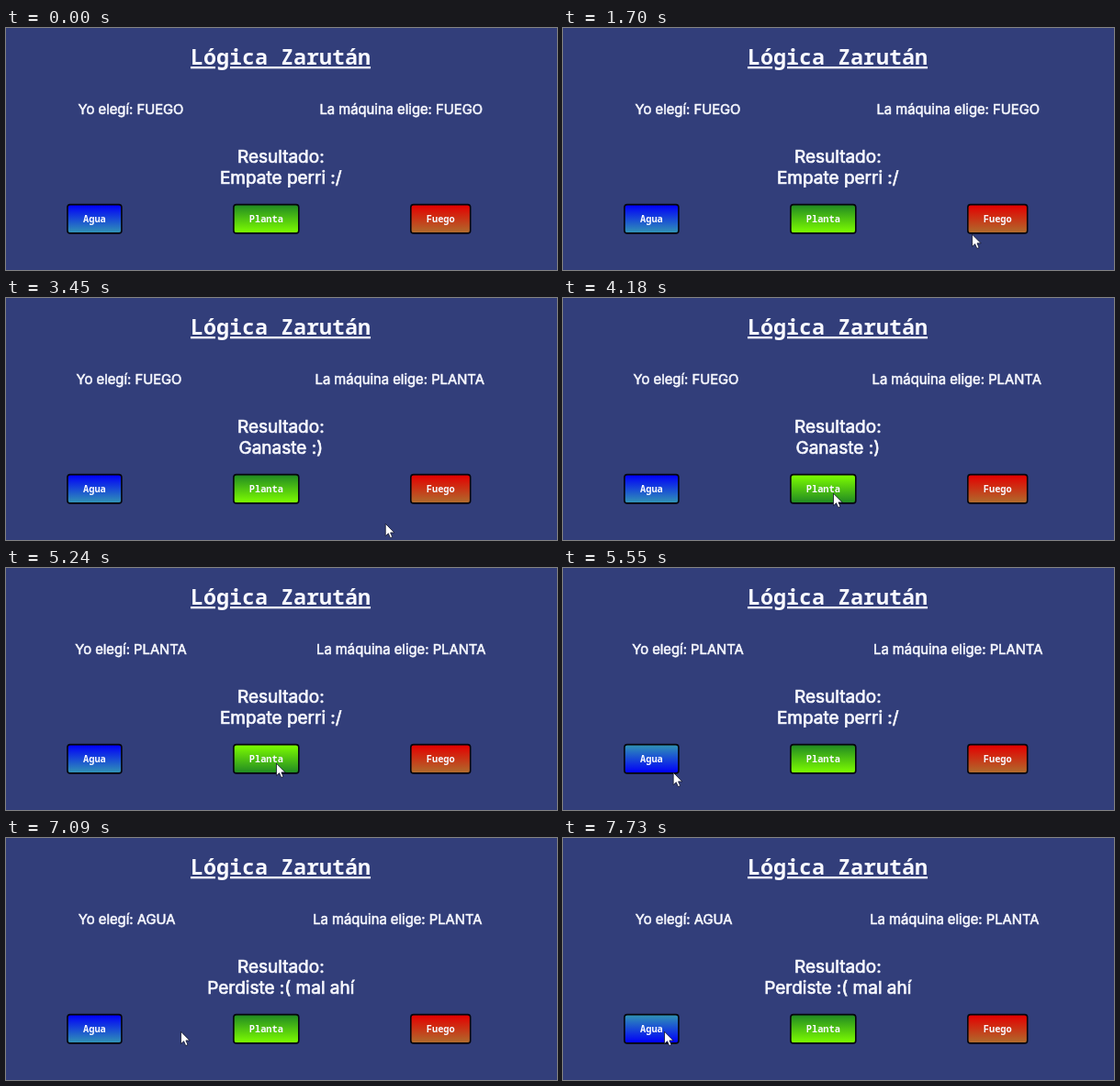
Write an HTML page that moves like this. It is 600 px wide and 264 px high and loops after 8.03 s.

```html
<!DOCTYPE html>
<html lang="es">
<head>
<meta charset="utf-8">
<title>Lógica Zarután</title>
<style>
  html, body { margin: 0; width: 100%; height: 100%; overflow: hidden; background: #323e7a; }
  svg { display: block; width: 100vw; height: 100vh; }
  text { fill: #f8f9ff; text-anchor: middle; white-space: pre; }
  .title {
    font: 700 23.35px "Noto Sans Mono", "DejaVu Sans Mono", monospace;
    text-decoration: underline;
    text-decoration-thickness: 1.8px;
    text-underline-offset: 2.2px;
  }
  /* Regular weight thickened by a stroke, like a synthetic bold */
  .pick, .result {
    font-family: Inter, "Open Sans", sans-serif;
    font-weight: 400;
    font-optical-sizing: none;
    stroke: #f8f9ff;
    stroke-width: .037em;
  }
  .pick { font-size: 14.8px; }
  .result { font-size: 19px; }
  .label { font: 700 10.3px "Noto Sans Mono", "DejaVu Sans Mono", monospace; }
</style>
</head>
<body>
<svg id="stage" viewBox="0 0 600 264">
  <defs id="defs"></defs>
  <rect width="600" height="264" fill="#323e7a"/>
  <text class="title" x="299" y="40">Lógica Zarután</text>
  <text class="pick" id="mine" y="94"></text>
  <text class="pick" id="rival" y="94"></text>
  <text class="result" x="299.3" y="147">Resultado:</text>
  <text class="result" id="outcome" x="299.3" y="170"></text>
  <g id="buttons"></g>
  <path id="cursor" d="m-.5-.8v13.4l3.1-2.9 2.1 4.9 2.3-1-2.1-4.7h4.2z"
        fill="#fff" stroke="#10142c" stroke-width=".8" stroke-linejoin="round"/>
</svg>
<script>
  const LOOP = 8030;
  const ENTER = 1270;
  const TOP = 191.8, HEIGHT = 32.9, BORDER = 1.6;
  const $ = id => document.getElementById(id);

  function add(parent, tag, attrs, text = '') {
    const el = document.createElementNS('http://www.w3.org/2000/svg', tag);
    for (const key in attrs) el.setAttribute(key, attrs[key]);
    el.textContent = text;
    parent.appendChild(el);
    return el;
  }

  function gradient(id, from, to) {
    const g = add($('defs'), 'linearGradient', { id, x1: 0, y1: 0, x2: 0, y2: 1 });
    add(g, 'stop', { offset: .03, 'stop-color': from });
    add(g, 'stop', { offset: .97, 'stop-color': to });
  }

  const buttons = [
    { name: 'Agua', x: 66.1, w: 60.6, from: '#0000f8', to: '#3092b6' },
    { name: 'Planta', x: 247.1, w: 72.5, from: '#228b22', to: '#7cfc00' },
    { name: 'Fuego', x: 440, w: 66.5, from: '#e40000', to: '#b06a2c' }
  ];

  for (const b of buttons) {
    gradient(b.name, b.from, b.to);
    gradient(b.name + 'Hover', b.to, b.from);
    b.rect = add($('buttons'), 'rect', {
      x: b.x + BORDER / 2, y: TOP + BORDER / 2,
      width: b.w - BORDER, height: HEIGHT - BORDER,
      rx: 3, stroke: '#05060c', 'stroke-width': BORDER
    });
    add($('buttons'), 'text', { class: 'label', x: b.x + b.w / 2, y: 212 }, b.name);
  }

  // start time, own choice and centre, rival choice and centre, outcome
  const rounds = [
    [0, 'FUEGO', 136, 'FUEGO', 430.2, 'Empate perri :/'],
    [2610, 'FUEGO', 134, 'PLANTA', 428.7, 'Ganaste :)'],
    [4450, 'PLANTA', 136, 'PLANTA', 430.2, 'Empate perri :/'],
    [6000, 'AGUA', 131.6, 'PLANTA', 426.3, 'Perdiste :( mal ahí']
  ];

  // time, x, y of the pointer tip
  const path = [
    [1270, 427, 262], [1700, 446, 226], [2000, 470, 214],
    [3240, 470, 214], [3450, 414, 247], [3740, 342, 243], [4060, 295, 214],
    [5240, 295, 214], [5550, 121, 224], [5790, 105, 213],
    [6550, 105, 213], [6910, 191, 212],
    [7090, 191, 212], [7450, 145, 219], [7730, 111, 212], [LOOP, 111, 212]
  ];

  // Slope at a key; resting ends have none.
  function slope(i, k) {
    const a = path[i - 1], b = path[i], c = path[i + 1];
    if (!a || !c || a[1] === b[1] || b[1] === c[1]) return 0;
    return (c[k] - a[k]) / (c[0] - a[0]);
  }

  function tip(t, k) {
    let i = 0;
    while (i < path.length - 2 && t >= path[i + 1][0]) i++;
    const a = path[i], b = path[i + 1], span = b[0] - a[0];
    const u = (t - a[0]) / span, v = 1 - u;
    return v * v * (1 + 2 * u) * a[k] + u * u * (3 - 2 * u) * b[k]
      + span * u * v * (v * slope(i, k) - u * slope(i + 1, k));
  }

  function write(el, text, x) {
    if (el.textContent !== text) el.textContent = text;
    if (x) el.setAttribute('x', x);
  }

  function draw(t) {
    const [, own, ownX, other, otherX, outcome] = rounds.filter(r => r[0] <= t).pop();
    write($('mine'), 'Yo elegí: ' + own, ownX);
    write($('rival'), 'La máquina elige: ' + other, otherX);
    write($('outcome'), outcome);

    const shown = t >= ENTER;
    const x = shown ? tip(t, 1) : -50;
    const y = shown ? tip(t, 2) : -50;
    $('cursor').setAttribute('transform', `translate(${x} ${y})`);
    for (const b of buttons) {
      const over = x >= b.x && x <= b.x + b.w && y >= TOP && y <= TOP + HEIGHT;
      b.rect.setAttribute('fill', `url(#${b.name}${over ? 'Hover' : ''})`);
    }
  }

  const start = performance.now();
  function frame() {
    draw((performance.now() - start) % LOOP);
    requestAnimationFrame(frame);
  }
  frame();
</script>
</body>
</html>
```
